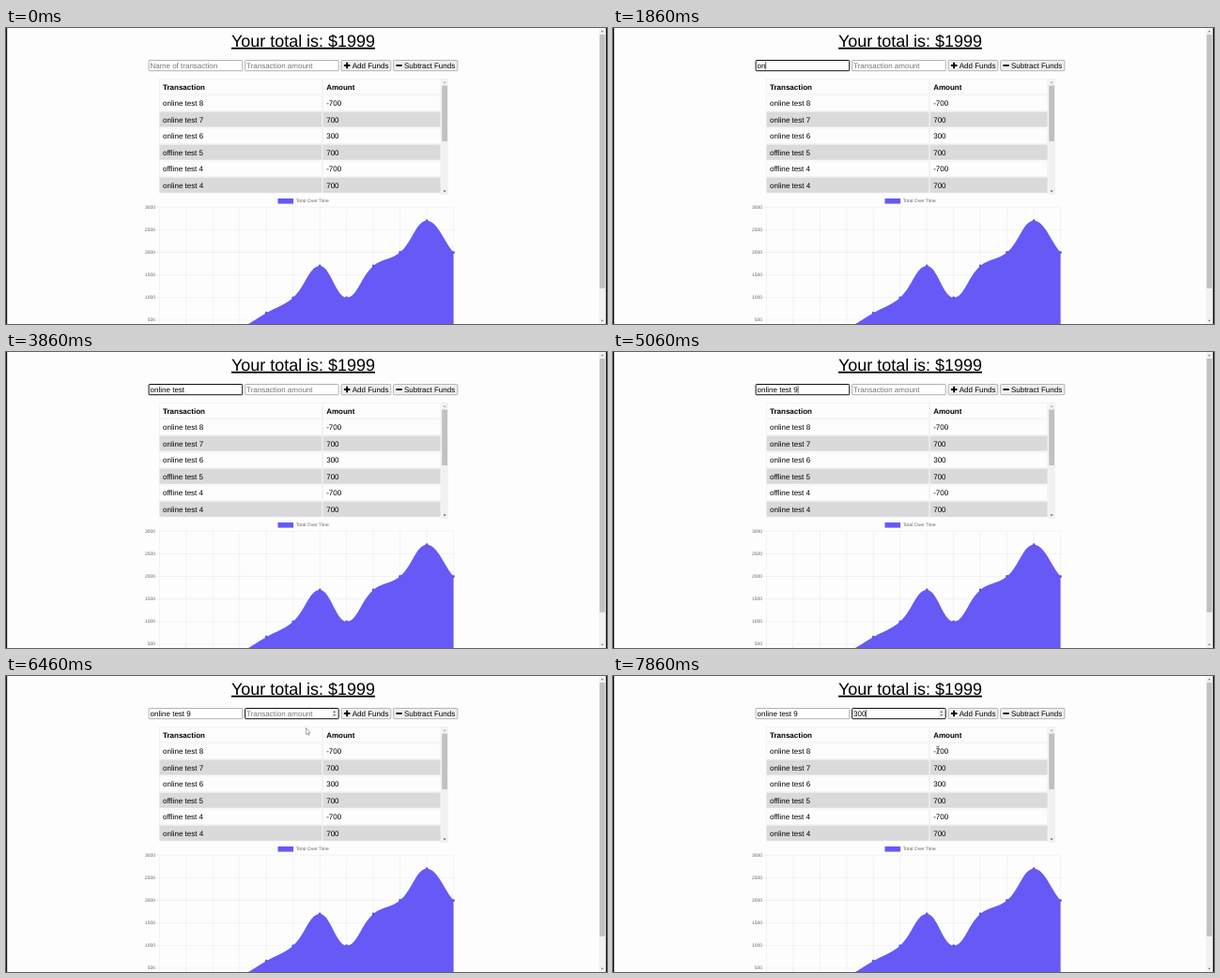
Write an HTML page that moves like this. It is 640x316 px and loops after 8000 ms.

```html
<!DOCTYPE html>
<html lang="en">
<head>
<meta charset="utf-8">
<style>
  html, body { margin: 0; width: 100%; height: 100%; overflow: hidden; background: #fdfdfd; }
  svg { display: block; width: 100vw; height: 100vh; }
  text { font: 8px "Liberation Sans", Arial, sans-serif; text-rendering: geometricPrecision; white-space: pre; }
  .title { font-size: 17.95px; text-decoration: underline; }
  .bold { font-weight: bold; }
  .small { font-size: 5px; fill: #666; }
  .hint { fill: #757575; }
</style>
</head>
<body>
<svg viewBox="0 0 640 316">
  <g id="page"></g>
  <g id="fields"></g>
  <g id="spinner" fill="#505050">
    <rect x="346.5" y="36" width="6.5" height="8.4" fill="#efefef"/>
    <path d="M348.4 39h2.6l-1.3-1.8zM348.4 41h2.6l-1.3 1.8z"/>
  </g>
  <circle id="ring" r="13.5" fill="none" stroke="#dc4a55" stroke-width="1.3"/>
  <path id="beam" d="M-1.8-4Q0-4 0-3Q0-4 1.8-4M0-3V3M-1.8 4Q0 4 0 3Q0 4 1.8 4" fill="none" stroke="#444" stroke-width=".7"/>
  <path id="arrow" d="M0-3V4L1.5 2.7L2.6 5L3.5 4.6L2.5 2.3H4.6Z" fill="#fff" stroke="#666" stroke-width=".55"/>
</svg>
<script>
const $ = id => document.getElementById(id);
const rect = (x, y, w, h, fill, extra = '') =>
  `<rect x="${x}" y="${y}" width="${w}" height="${h}" fill="${fill}" ${extra}/>`;
const text = (x, y, str, cls = '', extra = '') =>
  `<text x="${x}" y="${y}" class="${cls}" ${extra}>${str}</text>`;
const path = (d, fill, extra = '') => `<path d="${d}" fill="${fill}" ${extra}/>`;

function frame() {
  return rect(0, 0, 1.2, 316, '#111') + rect(638.6, 0, 1.4, 316, '#111') +
    rect(631.6, 0, 7, 316, '#f1f1f1') + rect(632.2, 7, 5.6, 271, '#c1c1c1') +
    path('M633.6 4.2h2.8l-1.4-1.8zM633.6 311.8h2.8l-1.4 1.8z', '#777');
}

function button(x, w, labelX, label, icon) {
  return rect(x, 34.5, w, 11.2, '#efefef', 'rx="1" stroke="#8a8a8a" stroke-width=".6"') +
    path(icon, 'none', 'stroke="#000" stroke-width="1.8"') + text(labelX, 42.6, label);
}

function table() {
  const rows = [['Transaction', 'Amount'], ['online test 8', '-700'], ['online test 7', '700'],
    ['online test 6', '300'], ['offline test 5', '700'], ['offline test 4', '-700'], ['online test 4', '700']];
  const body = rows.map(([name, amount], i) => {
    const y = 54.5 + 17.53 * i, fill = i && i % 2 === 0 ? '#dadada' : '#fdfdfd';
    const cell = (x, w, str) => rect(x, y, w, 16.3, fill, 'stroke="#e9e9e9" stroke-width=".5"') +
      text(x + 3.7, y + 11.1, str, i ? '' : 'bold');
    return cell(163.3, 173.2, name) + cell(337.5, 125.3, amount);
  }).join('');
  return body + rect(463.4, 54, 7.4, 124, '#f1f1f1') + rect(464.2, 61.5, 5.8, 59.5, '#c1c1c1') +
    path('M465.6 58.8h3l-1.5-1.8z', '#a3a3a3') + path('M465.6 173.4h3l-1.5 1.8z', '#505050');
}

function chart() {
  const left = 163.4, right = 476.6, step = (right - left) / 11, blue = '#6659f6';
  const yOf = value => 191.2 + (3000 - value) * 0.0483;
  const totals = [0, 390, 200, 330, 660, 1000, 1700, 1000, 1700, 2000, 2700, 1999];
  const pts = totals.map((v, i) => [left + step * i, yOf(v)]);
  let grid = '', labels = '';
  for (let v = 500; v <= 3000; v += 500) {
    grid += `M160 ${yOf(v)}H${right}`;
    labels += text(159, yOf(v) + 1.5, v, 'small', 'text-anchor="end"');
  }
  pts.forEach(([x]) => grid += `M${x} 191.2V316`);

  // Smooth spline with tension 0.4
  const handles = pts.map((p, i) => {
    const a = pts[i - 1] || p, b = pts[i + 1] || p;
    const d0 = Math.hypot(p[0] - a[0], p[1] - a[1]), d1 = Math.hypot(b[0] - p[0], b[1] - p[1]);
    const along = d => p.map((c, j) => c + d * 0.4 / (d0 + d1) * (b[j] - a[j]));
    return { before: along(-d0), after: along(d1) };
  });
  let curve = `M${pts[0]}`;
  for (let i = 1; i < pts.length; i++) curve += `C${handles[i - 1].after} ${handles[i].before} ${pts[i]}`;

  const dots = pts.map(([x, y]) => `<circle cx="${x}" cy="${y}" r="1.4" fill="#5f52e8"/>`).join('');
  return path(grid, 'none', 'stroke="#000" stroke-opacity=".08" stroke-width=".6"') + labels +
    path(`${curve}V340H${left}Z`, blue) + dots +
    rect(289.5, 182, 16.6, 5.6, blue) + text(308.8, 186.3, 'Total Over Time', 'small');
}

$('page').innerHTML = frame() +
  text(240, 19.8, 'Your total is: $1999', 'title') +
  button(357.1, 52.7, 368.7, 'Add Funds', 'M359.9 40H366.4M363.15 36.7V43.3') +
  button(412.6, 68.3, 423.9, 'Subtract Funds', 'M415.4 40H421.8') +
  table() + chart();

const LOOP = 8000, BLINK = 530, RING = 300;
const clicks = [{ at: 320, x: 170, y: 41 }, { at: 5790, x: 296, y: 43 }];
const inputs = [
  { x: 152.1, hint: 'Name of transaction', value: 'online test 9', focus: 395, blur: 5795,
    keys: [1400, 1660, 2060, 2200, 2260, 2400, 2600, 2660, 2725, 2930, 3130, 3330, 4000] },
  { x: 254.6, hint: 'Transaction amount', value: '300', focus: 5795, blur: Infinity,
    keys: [7195, 7400, 7600] }
];
const moves = [
  { from: 60, to: 300, until: 600, a: [230, 150], b: [170, 41] },
  { from: 5100, to: 5600, until: 6200, a: [170, 41], b: [296, 43] },
  { from: 6200, to: 6660, until: 7300, a: [296, 43], b: [335.3, 68.6] },
  { from: 7300, to: 7850, until: LOOP, a: [335.3, 68.6], b: [346, 79] }
];

const measure = document.createElement('canvas').getContext('2d');
measure.font = '80px "Liberation Sans", Arial, sans-serif';
const widthOf = str => measure.measureText(str).width / 10;

function drawInput({ x, hint, value, focus, blur, keys }, t) {
  const typed = keys.filter(k => k <= t), str = value.slice(0, typed.length);
  const focused = t >= focus && t < blur;
  const last = typed.length ? typed[typed.length - 1] : focus;
  const caretOn = focused && Math.floor((t - last) / BLINK) % 2 === 0;
  const stroke = focused ? 'stroke="#101010" stroke-width="1"' : 'stroke="#808080" stroke-width=".6"';
  return rect(x, 34.5, 99.6, 11.2, '#fff', `rx=".8" ${stroke}`) +
    text(x + 1.5, 42.6, str || hint, str ? '' : 'hint') +
    (caretOn ? rect(x + 1.5 + widthOf(str), 35.8, 0.6, 8.6, '#000') : '');
}

const show = (el, visible) => el.style.display = visible ? '' : 'none';

function drawPointer(t) {
  const move = moves.find(m => t >= m.from && t < m.until);
  show($('beam'), false);
  show($('arrow'), false);
  if (!move) return null;
  const p = Math.min(1, (t - move.from) / (move.to - move.from)), ease = p * p * (3 - 2 * p);
  const [x, y] = move.a.map((c, i) => c + (move.b[i] - c) * ease);
  const overText = y < 46 || y > 74;
  const pointer = $(overText ? 'beam' : 'arrow');
  show(pointer, true);
  pointer.setAttribute('transform', `translate(${x} ${y})`);
  return { x, y };
}

function render(now) {
  const t = now % LOOP;
  $('fields').innerHTML = inputs.map(input => drawInput(input, t)).join('');
  const pointer = drawPointer(t);
  const hovering = pointer && pointer.y < 46 && pointer.x > 254;
  show($('spinner'), t >= inputs[1].focus || hovering);

  const click = clicks.find(c => t >= c.at && t < c.at + RING);
  show($('ring'), click);
  if (click) {
    $('ring').setAttribute('transform', `translate(${click.x} ${click.y})`);
    $('ring').setAttribute('opacity', 0.85 * (1 - (t - click.at) / RING));
  }
  requestAnimationFrame(render);
}
requestAnimationFrame(render);
</script>
</body>
</html>
```
